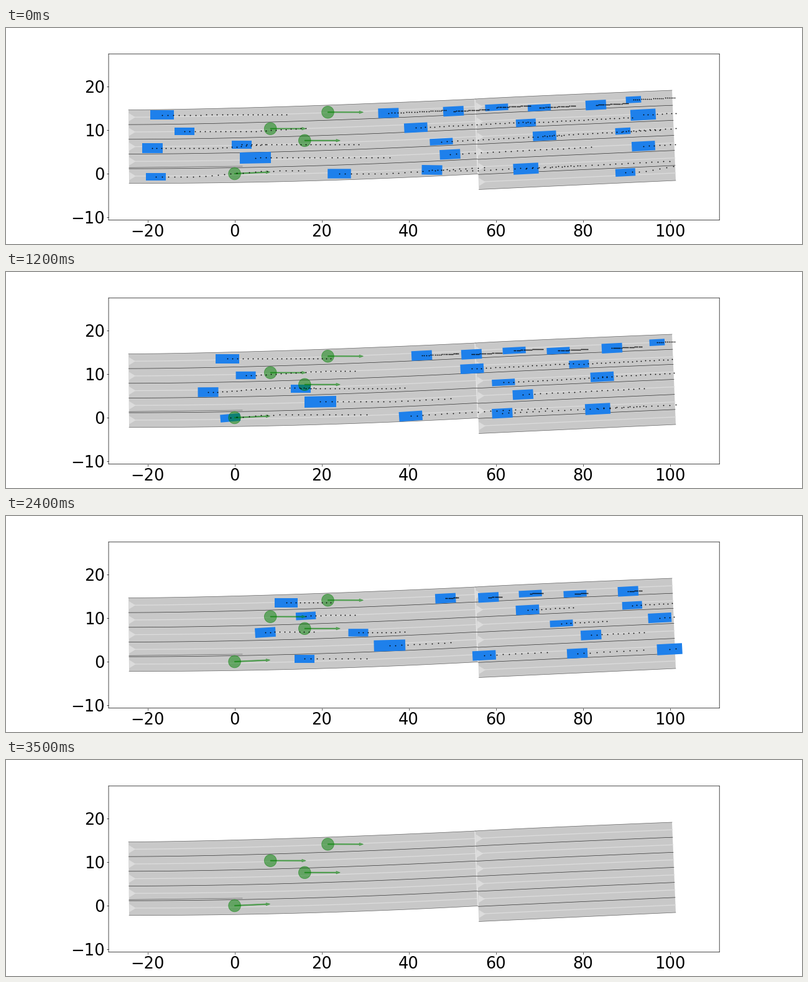
Animation, 1280 px wide and 347 px high, one loop 4.1 s. Source, as a matplotlib script:

```python
import numpy as np
import matplotlib.pyplot as plt
from matplotlib.animation import FuncAnimation
from matplotlib.patches import Circle, FancyArrow, Polygon

W, H, DPI = 1280, 347, 64
SCALE, ORIGIN = 7.0, (367.6, 234.3)      # pixels per metre, pixel of (0, 0)
BOX = (165, 41.8, 1147.2, 308.5)         # plot frame in stage pixels
STEP_MS, FRAMES, LAST_STEP, HORIZON = 100, 41, 34, 24

ROAD, LANE, CAR, AGENT = "#c8c8c8", "#dcdcdc", "#1e80eb", "g"

CLIMB, CLIMB_X = -0.052, 615             # the traffic runs level, then climbs
EXIT_X = 1077.5                          # cars vanish at the end of the road
LANE_CHANGE = 16                         # steps

fig = plt.figure(figsize=(W / DPI, H / DPI), dpi=DPI)

# Frame with metre ticks
left, top, right, bottom = BOX
plot = fig.add_axes([left / W, 1 - bottom / H, (right - left) / W, (bottom - top) / H])
plot.set_xlim((left - ORIGIN[0]) / SCALE, (right - ORIGIN[0]) / SCALE)
plot.set_ylim((ORIGIN[1] - bottom) / SCALE, (ORIGIN[1] - top) / SCALE)
plot.set_xticks(range(-20, 101, 20))
plot.set_yticks(range(-10, 21, 10))
plot.tick_params(labelsize=29)
for spine in plot.spines.values():
    spine.set_snap(False)

# Everything else is drawn in stage pixels
stage = fig.add_axes([0, 0, 1, 1])
stage.set_xlim(0, W)
stage.set_ylim(H, 0)
stage.axis("off")


def lerp(a, b, t):
    return a + (b - a) * t


def boundary(points, alpha):
    stage.plot(*np.transpose(points), color="k", alpha=alpha, lw=0.8, zorder=0.4)


class Section:
    """A bundle of lanes between four corners; f runs from the top edge to the bottom edge."""

    def __init__(self, lanes, starts, ends, bends):
        self.lanes, self.starts, self.ends, self.bends = lanes, np.array(starts), np.array(ends), bends

    def line(self, f):
        t = np.linspace(0, 1, 60)
        (x0, y0), (x1, y1) = lerp(*self.starts, f), lerp(*self.ends, f)
        return np.column_stack([lerp(x0, x1, t), lerp(y0, y1, t ** lerp(*self.bends, f))])

    def draw(self):
        outline = np.vstack([self.line(0), self.line(1)[::-1]])
        stage.add_patch(Polygon(outline, fc=ROAD, ec="none", zorder=0))
        for k in range(self.lanes):
            centre = self.line((k + 0.5) / self.lanes)
            x, y = centre[0]
            head = [(x + 0.5, y - 6.5), (x + 11, y), (x + 0.5, y + 6.5)]
            stage.add_patch(Polygon(head, fc=LANE, ec="none", zorder=0.2))
            stage.plot(*centre[1:].T, color=LANE, lw=1.5, zorder=0.2)
        for k in range(self.lanes + 1):
            boundary(self.line(k / self.lanes), 0.75 if 0 < k < self.lanes else 0.55)


west = Section(5, [(197, 131.5), (198, 249.7)], [(755, 114), (759, 234.5)], (1.5, 2))
east = Section(6, [(755, 114), (760.5, 259.5)], [(1071, 100), (1077, 245)], (0.9, 1))
west.draw()
east.draw()
boundary([(197.8, 224.3), (380, 222)], 0.5)
stage.plot([754, 758.5], [114, 234], color="#e4e4e4", lw=1.6, zorder=0.3)

# Agents with heading arrows
for x, y, rise in [(367.6, 234, 2.6), (425.2, 161.7, 0), (480.3, 180.8, 0), (517.5, 135.3, 0)]:
    style = dict(color=AGENT, alpha=0.5, lw=1, zorder=1.5)
    stage.add_patch(Circle((x, y), 9.8, **style))
    stage.add_patch(FancyArrow(x, y, 57, -rise, width=1.4, head_width=4.2,
                               head_length=6.3, length_includes_head=True, **style))


def climb(x):
    """Height gained at x, with a soft bend where the climb begins."""
    return CLIMB * 10 * np.logaddexp(0, (x - CLIMB_X) / 10)


def smoothstep(u):
    u = np.clip(u, 0, 1)
    return u * u * (3 - 2 * u)


class Car:
    """speed is the mean in pixels per step; brake > 0 slows down, < 0 speeds up.
    shift is a sideways lane change that begins at step shift_at."""

    def __init__(self, size, x, y, speed, brake=0, shift=0, shift_at=0):
        step = np.arange(LAST_STEP + 1)
        u = step / LAST_STEP
        xs = x + speed * LAST_STEP * (u + brake * u * (1 - u))
        ys = y + climb(xs) - climb(x) + shift * smoothstep((step - shift_at) / LANE_CHANGE)
        self.heading = np.arctan2(np.gradient(ys), np.gradient(xs))
        self.path = np.column_stack([xs, ys])[xs < EXIT_X]
        self.corners = np.array([(-1, -1), (1, -1), (1, 1), (-1, 1)]) * size / 2
        self.body = stage.add_patch(Polygon(self.corners, fc=CAR, ec="none", zorder=1))
        self.dots, = stage.plot([], [], "ko", ms=2, mew=0, zorder=2, snap=False)

    def update(self, step):
        alive = step < len(self.path)
        self.body.set_visible(alive)
        self.dots.set_visible(alive)
        if alive:
            c, s = np.cos(self.heading[step]), np.sin(self.heading[step])
            self.body.set_xy(self.corners @ [(c, s), (-s, c)] + self.path[step])
            self.dots.set_data(*self.path[step:step + HORIZON + 1].T)


MINI, COMPACT, LOW = np.array([24.5, 10.5]), np.array([32, 12.3]), np.array([37, 10.5])
SEDAN, SUV = np.array([33, 15.5]), np.array([37.5, 15.3])
LARGE, TRUCK = np.array([40.5, 17.5]), np.array([50.5, 18])

cars = [
    # level west side
    Car(SUV, 251, 139.5, 7.97, brake=0.15),
    Car(COMPACT, 287, 166, 8.06, brake=0.03, shift=-6.5, shift_at=12),
    Car(SEDAN, 235, 193, 7.65, brake=-0.03, shift=-7, shift_at=12),
    Car(COMPACT, 379, 187.4, 7.7, brake=0.05),
    Car(TRUCK, 401, 208.5, 9.24, brake=-0.09),
    Car(COMPACT, 241, 239, 9.97, shift=-9.5, shift_at=4),
    # bottom lanes
    Car(SUV, 536, 234, 9.82, brake=-0.04, shift=-2, shift_at=6),
    Car(SEDAN, 685, 225.8, 10, brake=-0.09, shift=7, shift_at=-6),
    Car(LARGE, 836, 226, 9.63),
    Car(COMPACT, 996, 232, 11, shift=-18, shift_at=1),
    # middle lanes
    Car(SEDAN, 714, 203, 9.18, brake=0.1),
    Car(SUV, 1025, 189.7, 8.5),
    Car(LARGE, 1024.5, 139.3, 7.5),
    Car(SUV, 866, 173.2, 7.72),
    Car(MINI, 992, 165.6, 8.5),
    Car(LOW, 700, 182.6, 7.82, brake=0.1),
    Car(SUV, 659, 160.1, 7.44, brake=0.02),
    Car(COMPACT, 836, 152.4, 7.12),
    # slow top lane
    Car(SEDAN, 615, 136.6, 3.29, brake=0.55),
    Car(SEDAN, 719.5, 133.7, 2.28, brake=0.1),
    Car(LOW, 789, 127.5, 2.18, brake=0.12),
    Car(LOW, 857.5, 128, 2.28, brake=0.18),
    Car(SEDAN, 948.5, 123.7, 2.16),
    Car(MINI, 1009, 115.1, 3.16),
]


def update(frame):
    for car in cars:
        car.update(min(frame, LAST_STEP + 1))
    return []


anim = FuncAnimation(fig, update, frames=FRAMES, interval=STEP_MS, repeat=True, repeat_delay=0)
plt.show()
```
